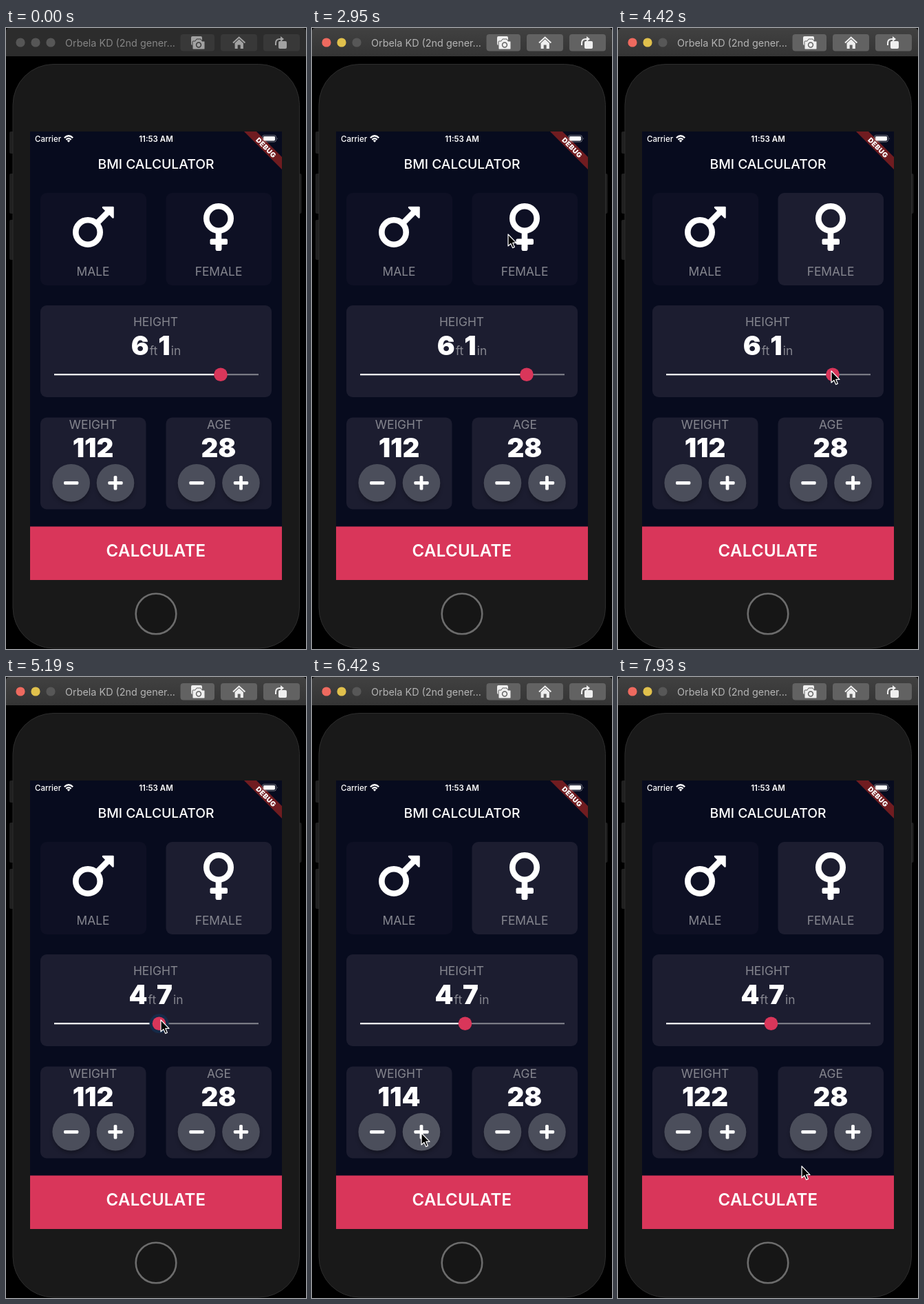
An HTML page that plays this animation: 436x900 px, repeating every 8000 ms.

```html
<!DOCTYPE html>
<html lang="en">
<head>
<meta charset="utf-8">
<title>BMI calculator</title>
<style>
html, body { margin: 0; width: 100%; height: 100%; overflow: hidden; background: #000; }
svg { display: block; width: 100vw; height: 100vh; }
text { font-family: Inter, Roboto, sans-serif; fill: #fff; }
.mid { text-anchor: middle; }
.label { font-size: 17.4px; fill: #85868f; text-anchor: middle; }
.num { font-size: 38.5px; font-weight: 900; text-anchor: middle; }
.unit { font-size: 17.4px; font-weight: 400; fill: #85868f; }
.on { fill: #1c1d30; }
.off { fill: #0e1024; }
#bar { --btn: #383838; --ink: #a2a2a2; --title: #858585; --c1: #565656; --c2: #565656; }
#bar.active { --btn: #626262; --ink: #efefef; --title: #b4b4b4; --c1: #ee6a5f; --c2: #e0c04c; }
#bar .btn { fill: var(--btn); }
#bar .ink { fill: var(--ink); }
#bar .line { fill: none; stroke: var(--ink); stroke-width: 2; }
#bar text { fill: var(--title); font-size: 14.4px; }
</style>
</head>
<body>
<svg viewBox="0 0 436 900" xmlns="http://www.w3.org/2000/svg">
  <defs>
    <linearGradient id="chrome" x2="0" y2="1">
      <stop stop-color="#414141"/><stop offset="1" stop-color="#343434"/>
    </linearGradient>
    <clipPath id="screen"><rect x="35" y="150" width="366" height="650"/></clipPath>
    <filter id="soft" x="-30%" y="-30%" width="160%" height="160%"><feGaussianBlur stdDeviation="3"/></filter>
    <g id="round">
      <circle cy="4" r="26" fill="#000" opacity=".35" filter="url(#soft)"/>
      <circle r="27.3" fill="#4b4e5b"/>
      <rect x="-10.7" y="-2.4" width="21.4" height="4.8" rx="1.6" fill="#fff"/>
    </g>
    <g id="plus">
      <use href="#round"/>
      <rect x="-2.4" y="-10.3" width="4.8" height="20.6" rx="1.6" fill="#fff"/>
    </g>
  </defs>
  <rect width="436" height="900" fill="#000"/>

  <g id="bar">
    <path id="strip" d="M0 41V5Q0 0 5 0H431Q436 0 436 5V41Z" fill="#2c2c2c"/>
    <circle cx="21" cy="21" r="6.6" fill="var(--c1)"/>
    <circle cx="43" cy="21" r="6.6" fill="var(--c2)"/>
    <circle cx="65" cy="21" r="6.6" fill="#575757"/>
    <text x="86" y="26.5">Orbela KD (2nd gener...</text>
    <rect class="btn" x="253.5" y="9" width="49.5" height="24.5" rx="4"/>
    <rect class="btn" x="312" y="9" width="53" height="24.5" rx="4"/>
    <rect class="btn" x="374" y="9" width="53" height="24.5" rx="4"/>
    <rect class="ink" x="269" y="12" width="16" height="13" rx="2"/>
    <path class="ink" d="M272 19h3l2-3h6l2 3h3q1 0 1 1v10q0 1-1 1h-16q-1 0-1-1v-10q0-1 1-1Z" stroke="var(--btn)"/>
    <circle cx="280" cy="24.5" r="3.4" class="ink" stroke="var(--btn)" stroke-width="1.5"/>
    <path class="line" d="M330 21.5l8.7-8 8.7 8"/>
    <path class="ink" d="M332.5 22l6.2-5.7 6.2 5.7v8h-4.2v-5.500h-4v5.500h-4Z"/>
    <rect class="ink" x="396" y="19" width="12" height="11" rx="2"/>
    <path class="line" d="M392 25v-3q0-6 6-6h2" stroke-width="1.500"/>
    <path class="ink" d="M399 12l5 4-5 4Z"/>
  </g>

  <g fill="#202020">
    <rect x="5" y="150" width="8" height="32" rx="2"/>
    <rect x="5" y="211" width="8" height="58" rx="2"/>
    <rect x="5" y="278" width="8" height="58" rx="2"/>
    <rect x="422" y="211" width="7.5" height="58" rx="2"/>
  </g>
  <rect x="10" y="52.5" width="416.500" height="846.500" rx="59" fill="#191919" stroke="#2d2d2d"/>
  <circle cx="218" cy="849" r="29.3" fill="#161616" stroke="#6c6c6c" stroke-width="2.6"/>

  <g clip-path="url(#screen)">
    <rect x="35" y="150" width="366" height="650" fill="#070b1e"/>
    <text class="mid" x="218" y="204.300" font-size="19.3" font-weight="500">BMI CALCULATOR</text>

    <rect class="off" x="50" y="239" width="154" height="134" rx="9"/>
    <rect id="female" x="232.500" y="239" width="153.500" height="134" rx="9"/>
    <g fill="none" stroke="#fff" stroke-width="8.600">
      <circle cx="119" cy="296" r="17.700"/>
      <path d="M132 283L148 267"/>
      <circle cx="309" cy="276" r="17.700"/>
      <path d="M309 296V321" stroke-linecap="butt"/>
    </g>
    <path d="M141 260H155.500V274.500Z" fill="#fff" stroke="#fff" stroke-width="2.500" stroke-linejoin="round"/>
    <rect x="304.700" y="312" width="8.600" height="11" rx="2" fill="#fff"/>
    <rect x="296.500" y="305.500" width="25.500" height="8.500" rx="2" fill="#fff"/>
    <text class="label" x="126.500" y="358.500">MALE</text>
    <text class="label" x="309" y="358.500">FEMALE</text>

    <rect class="on" x="50" y="402" width="336" height="133" rx="9"/>
    <text class="label" x="217.500" y="432">HEIGHT</text>
    <text class="num" x="218" y="473.500"><tspan id="feet"></tspan><tspan class="unit" dx="1">ft</tspan><tspan id="inch" dx="1"></tspan><tspan class="unit" dx="1">in</tspan></text>
    <path d="M70 502.300H367" stroke="#85868f" stroke-width="2"/>
    <path id="track" stroke="#fff" stroke-width="2"/>
    <circle id="halo" cy="502.300" fill="#152a48"/>
    <circle id="thumb" cy="502.300" r="9.800" fill="#d9365a"/>

    <rect class="on" x="50" y="564.500" width="153.500" height="133" rx="9"/>
    <rect class="on" x="232.500" y="564.500" width="153.500" height="133" rx="9"/>
    <text class="label" x="126.500" y="581">WEIGHT</text>
    <text class="label" x="309.500" y="581">AGE</text>
    <text class="num" id="weight" x="126.500" y="622"></text>
    <text class="num" x="309" y="622">28</text>
    <use href="#round" x="94.700" y="659.300"/>
    <use href="#plus" x="159" y="659.300"/>
    <circle id="press" cx="159" cy="659.300" r="27.300" fill="#fff" opacity=".05"/>
    <use href="#round" x="277" y="659.300"/>
    <use href="#plus" x="341.500" y="659.300"/>

    <rect x="35" y="722.500" width="366" height="78" fill="#d9365a"/>
    <text class="mid" x="218" y="765.500" font-size="24" font-weight="600" letter-spacing=".3">CALCULATE</text>

    <path d="M346 150H364L401 187V205Z" fill="#701c20"/>
    <text class="mid" transform="translate(378 173.500) rotate(45)" y="3.600" font-size="10" font-weight="900" letter-spacing=".4">DEBUG</text>
    <text x="42" y="164.500" font-size="11.500" font-weight="500">Carrier</text>
    <text class="mid" x="218" y="164.500" font-size="11.500" font-weight="600">11:53 AM</text>
    <g fill="none" stroke="#fff" stroke-width="2.200">
      <path d="M84.800 159.200Q91 153.300 97.200 159.200"/>
      <path d="M87.400 161.900Q91 158.500 94.600 161.900"/>
    </g>
    <path d="M88.800 163.300Q91 161.400 93.200 163.300L91 165.700Z" fill="#fff"/>
    <rect x="372.500" y="155.500" width="20" height="9.500" rx="2.600" fill="none" stroke="#fff" stroke-opacity=".4"/>
    <rect x="374" y="157" width="17" height="6.500" rx="1.400" fill="#fff"/>
    <path d="M394 158.500q1.500 1.700 0 3.400Z" fill="#fff" opacity=".5"/>
  </g>

  <path id="cursor" d="M0 0V17L3.900 13.500 6.600 19.600 9.400 18.400 6.800 12.400H12Z" fill="#000" stroke="#fff" stroke-width="1.200" stroke-linejoin="round"/>
</svg>
<script>
const LOOP = 8000;
const $ = id => document.getElementById(id);
const set = (id, attrs) => { for (const k in attrs) $(id).setAttribute(k, attrs[k]); };
const clamp = (v, a, b) => Math.min(b, Math.max(a, v));

// start, end, number of steps, waypoints of the pointer tip
const moves = [
  [1090, 1380, 4, [[271, 388], [235, 389], [194, 393]]],
  [1680, 2260, 7, [[192, 377], [125, 292], [109, 262], [150, 246], [220, 268], [286, 315]]],
  [2460, 2550, 2, [[280, 308], [273, 303]]],
  [2950, 3050, 2, [[285, 299], [307, 307]]],
  [3540, 4320, 9, [[309, 312], [330, 380], [352, 520], [355, 600], [340, 630], [312, 590], [290, 540], [304, 503]]],
  [4420, 4700, 4, [[310, 497], [225, 497]]],
  [5190, 5940, 9, [[225, 497], [222, 510], [195, 590], [155, 668], [147, 671], [159, 661]]],
  [7830, 7930, 2, [[200, 684], [267, 709]]]
];

function along(points, p) {
  const u = p * (points.length - 1);
  const i = Math.min(Math.floor(u), points.length - 2);
  return points[i].map((v, k) => v + (points[i + 1][k] - v) * (u - i));
}

function pointer(t) {
  const move = moves.filter(m => t >= m[0]).pop();
  if (!move) return null;
  const [start, end, steps, points] = move;
  const step = (end - start) / (steps - 1);
  const n = Math.floor((t - start) / step + 0.06);
  return along(points, clamp(n / (steps - 1), 0, 1));
}

function haloRadius(t) {
  if (t < 4500 || t >= 5380) return 0;
  if (t < 4600) return 14;
  if (t < 5190) return 20;
  return t < 5285 ? 14 : 10.5;
}

function draw(t) {
  $("bar").classList.toggle("active", t >= 200);
  set("strip", { fill: t < 200 ? "#2c2c2c" : "url(#chrome)" });
  set("female", { class: t < 3240 ? "off" : "on" });

  const tip = pointer(t);
  set("cursor", tip
    ? { visibility: "visible", transform: `translate(${tip})` }
    : { visibility: "hidden" });

  const drag = t < 4420 ? 0 : t < 4720 ? (310 - tip[0]) / 85 : 1;
  const x = 312 - 89.5 * drag;
  const height = Math.round(24 + (x - 70) / 4.95);
  $("feet").textContent = Math.floor(height / 12);
  $("inch").textContent = height % 12;
  set("thumb", { cx: x });
  set("halo", { cx: x, r: haloRadius(t) });
  set("track", { d: `M70 502.3H${x}` });

  $("weight").textContent = 112 + clamp(Math.floor((t - 6090) / 165), 0, 10);
  set("press", { visibility: t >= 6040 && t < 7830 ? "visible" : "hidden" });
}

function tick() {
  draw(performance.now() % LOOP);
  requestAnimationFrame(tick);
}
tick();
</script>
</body>
</html>
```
